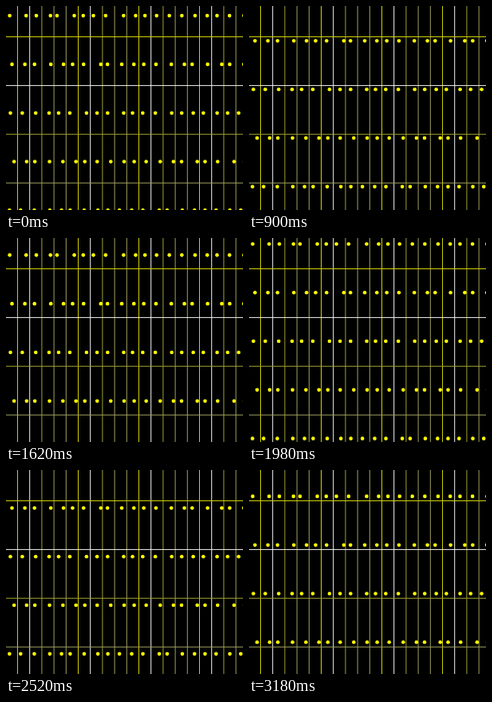
Recreate the animation shown at these times as an HTML page with a canvas. Size 297 by 255 pixels, loop 3.36 s.

```html
<!DOCTYPE html>
<html lang="en">
<head>
<meta charset="utf-8">
<title>Dots on a grid</title>
<style>
html, body { margin: 0; width: 100%; height: 100%; overflow: hidden; background: #000; }
canvas { display: block; }
</style>
</head>
<body>
<canvas id="stage" width="297" height="255"></canvas>
<script>
const W = 297, H = 255;
const LOOP = 3360, STEP = 60, LAST = 53;
const ctx = document.getElementById('stage').getContext('2d');

const COL_GAP = 15.2, ROW_GAP = 60.8, LINE_GAP = 60.9;
const COLORS = ['#d0d000', '#f4f4f4', '#a0a030', '#a0a060', '#a0a060'];
const ROWS = 5, DOTS = 20, RADIUS = 2.3;

function seeded(seed) {
  return () => {
    seed = (seed * 1664525 + 1013904223) % 4294967296;
    return seed / 4294967296;
  };
}

// One dot per grid cell, shifted at random; odd rows sit further right.
const random = seeded(7);
const rows = Array.from({ length: ROWS }, (_, r) =>
  Array.from({ length: DOTS }, (_, i) =>
    i * COL_GAP + (r % 2 ? 8.6 : 6.7) + (random() - 0.5) * 8));

// Slow even drift up, then an eased drop back down.
const CYCLE = 31, DROP = 6.8, DROP_START = 14;
const TOP = -20.5, BOTTOM = 35.5;

function offsetAt(step) {
  const p = (step - DROP_START + CYCLE) % CYCLE;
  const k = p < DROP
    ? (1 - Math.cos(Math.PI * p / DROP)) / 2
    : 1 - (p - DROP) / (CYCLE - DROP);
  return TOP + (BOTTOM - TOP) * k;
}

// Fractional positions soften the lines that fall between pixels.
function drawGrid() {
  for (let i = 0; 14 + i * COL_GAP < W; i++) {
    ctx.fillStyle = COLORS[i % 5];
    ctx.fillRect(14 + i * COL_GAP, 0, 1, H);
  }
  for (let i = 0; 38 + i * LINE_GAP < H; i++) {
    ctx.fillStyle = COLORS[i % 5];
    ctx.fillRect(0, 38 + i * LINE_GAP, W, 1);
  }
}

function drawDots(offset) {
  ctx.fillStyle = '#ff0';
  rows.forEach((row, r) => {
    const y = offset + r * ROW_GAP + 0.2;
    for (const x of row) {
      ctx.beginPath();
      ctx.arc(x, y, RADIUS, 0, Math.PI * 2);
      ctx.fill();
    }
  });
}

function draw(time) {
  const step = Math.min(LAST, Math.floor(time % LOOP / STEP));
  ctx.fillStyle = '#000';
  ctx.fillRect(0, 0, W, H);
  drawGrid();
  drawDots(offsetAt(step));
}

const start = performance.now();
function tick() {
  draw(performance.now() - start);
  requestAnimationFrame(tick);
}
tick();
</script>
</body>
</html>
```
